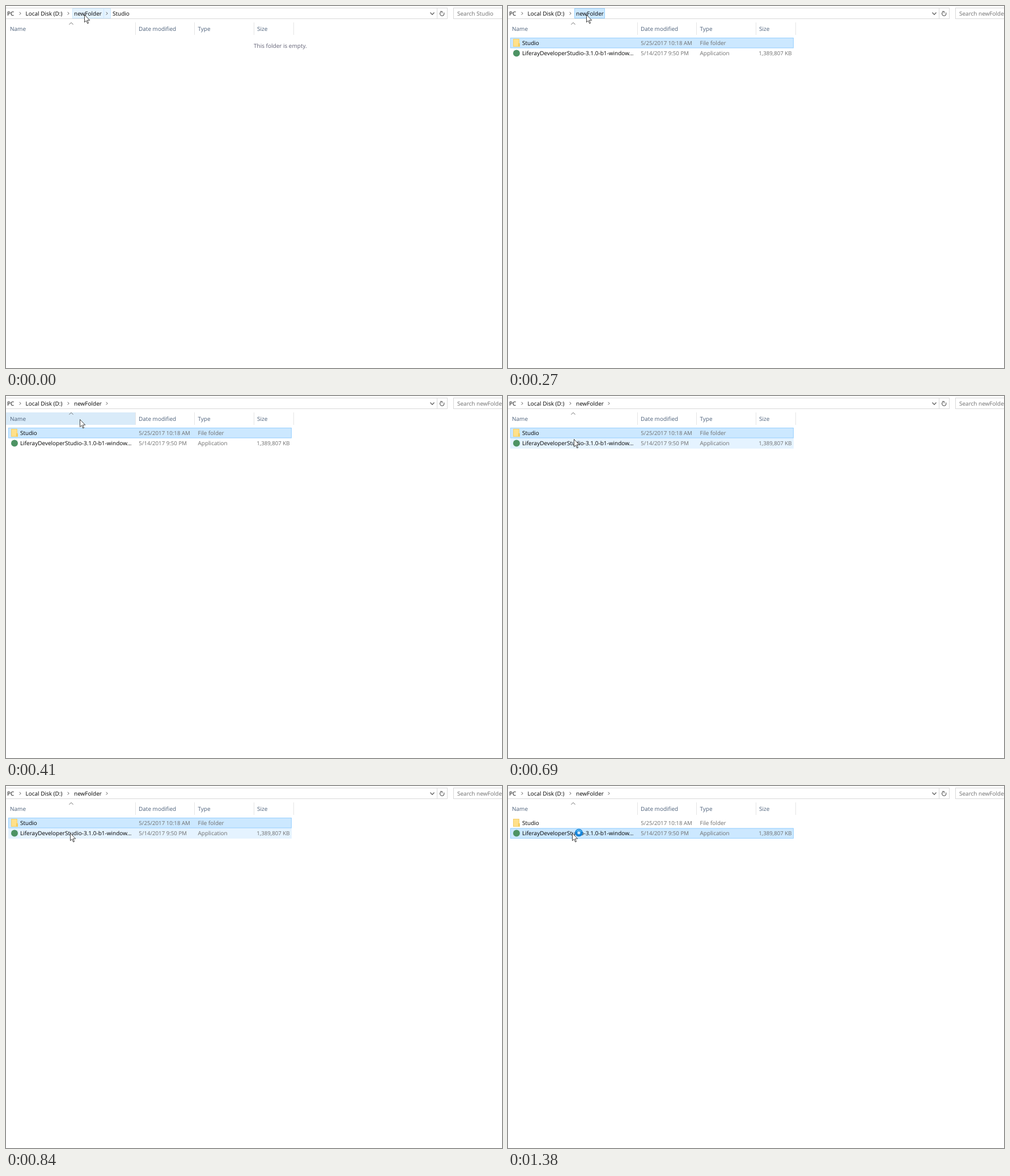
An HTML page with a canvas that plays this animation: 875 px wide and 640 px high, repeating every 8 s.

```html
<!DOCTYPE html>
<html lang="en">
<head>
<meta charset="utf-8">
<title>File browser</title>
<style>
html, body { margin: 0; width: 100%; height: 100%; overflow: hidden; background: #fff; }
canvas { display: block; }
</style>
</head>
<body>
<canvas width="875" height="640"></canvas>
<script>
const ctx = document.querySelector('canvas').getContext('2d');
const LOOP = 8000;
const PRESS = 140, OPEN = 270, HEADER_HOVER = 410, LEAVE_HEADER = 540, ROW_HOVER = 690, SELECT = 1100, BUSY = 1380;
const GREY = '#6d6d6d', HEADER = '#4c607a', HOVER = '#e5f3ff', ACTIVE = '#cce8ff', EDGE = '#99d1ff';
const ROW_TOP = 56, ROW_HEIGHT = 18.5;

// Pointer tip: start time, x, y
const pointerStops = [[0, 138, 15], [410, 130, 41], [540, 119, 68], [690, 116, 76], [840, 113, 83]];

function text(str, x, y, color = '#000', align = 'left', size = 10) {
  ctx.font = `${size}px "Open Sans", "Noto Sans", sans-serif`;
  ctx.fillStyle = color;
  ctx.textAlign = align;
  ctx.fillText(str, x, y);
}

function box(x, y, w, h, fill, edge) {
  ctx.fillStyle = fill;
  ctx.fillRect(x, y, w, h);
  if (!edge) return;
  ctx.strokeStyle = edge;
  ctx.lineWidth = 1;
  ctx.strokeRect(x + .5, y + .5, w - 1, h - 1);
}

function line(points, color, width = 1) {
  ctx.beginPath();
  points.forEach(([x, y]) => ctx.lineTo(x, y));
  ctx.strokeStyle = color;
  ctx.lineWidth = width;
  ctx.stroke();
}

function disc(x, y, r, color) {
  ctx.beginPath();
  ctx.arc(x, y, r, 0, Math.PI * 2);
  ctx.fillStyle = color;
  ctx.fill();
}

const chevron = x => line([[x - 1.3, 10.8], [x + 1.1, 13.2], [x - 1.3, 15.6]], '#555');

function addressBar(t) {
  const opened = t >= OPEN;
  box(-2, 3, 781, 20, '#fff', '#d9d9d9');
  line([[760.5, 3], [760.5, 23]], '#d9d9d9');
  box(789, 3, 90, 20, '#fff', '#d9d9d9');

  if (t < HEADER_HOVER) {
    const colors = t < PRESS ? [HOVER, ACTIVE] : [ACTIVE, EDGE];
    box(117, 4, opened ? 54 : 56, 18, ...colors);
    if (!opened) box(172, 4, 13, 18, ...colors);
  }
  text('PC', 2, 17);
  chevron(25);
  text('Local Disk (D:)', 34.5, 17);
  chevron(110);
  text('newFolder', 120, 17);
  if (!opened || t >= HEADER_HOVER) chevron(178);
  if (!opened) text('Studio', 188, 17);
  text('Search ' + (opened ? 'newFolder' : 'Studio'), 796, 17, GREY);

  line([[748.5, 11.5], [752, 15.2], [755.5, 11.5]], '#666', 1.4);
  ctx.beginPath();
  ctx.arc(769.3, 13.7, 3.6, -.6, Math.PI * 1.3);
  ctx.strokeStyle = '#555';
  ctx.lineWidth = 1.1;
  ctx.stroke();
  line([[766, 9.5], [769.3, 9.5], [769.3, 12.8]], '#555', 1.1);
}

function columns(t) {
  if (t >= HEADER_HOVER && t < LEAVE_HEADER) box(0, 29, 229, 22, '#d9ebf9');
  for (const x of [228.5, 332.5, 437.5, 507.5]) line([[x, 29], [x, 51]], '#e5e5e5');
  text('Name', 7, 44, HEADER);
  text('Date modified', 234, 44, HEADER);
  text('Type', 338.5, 44, HEADER);
  text('Size', 443, 44, HEADER);
  line([[111.5, 32.8], [115, 29.3], [118.5, 32.8]], '#666');
}

const rowBox = (index, fill, edge) => box(4, ROW_TOP + index * ROW_HEIGHT, 500, ROW_HEIGHT, fill, edge);

function row(y, name, date, type, size) {
  text(name, 25, y);
  text(date, 234.3, y, GREY, 'left', 9.7);
  text(type, 338.5, y, GREY);
  text(size, 500.5, y, GREY, 'right', 9.7);
}

function files(t) {
  if (t < OPEN) return text('This folder is empty.', 437, 74, '#5f5f73');
  if (t >= ROW_HOVER && t < SELECT) rowBox(1, HOVER);
  rowBox(t < SELECT ? 0 : 1, ACTIVE, EDGE);

  box(9, 58, 11, 14, '#ffe08a', '#f3cf6b');
  box(18, 66, 3, 6, '#f5cd5c');
  disc(15, 83.5, 6, '#4d9364');
  row(69, 'Studio', '5/25/2017 10:18 AM', 'File folder', '');
  row(87, 'LiferayDeveloperStudio-3.1.0-b1-window...', '5/14/2017 9:50 PM', 'Application', '1,389,807 KB');
}

function busyRing() {
  disc(125, 82.7, 6.9, '#1583d8');
  ctx.beginPath();
  ctx.arc(125, 82.7, 4.7, -2.6, -.4);
  ctx.strokeStyle = '#63c2f5';
  ctx.lineWidth = 1.6;
  ctx.stroke();
  disc(125, 82.7, 2.6, '#cce8ff');
}

function pointer(t) {
  const [, x, y] = pointerStops.findLast(([start]) => t >= start);
  ctx.save();
  ctx.translate(x + .5, y + .5);
  const shape = new Path2D('M0 0V13.2L3 10.5L5.3 15.5L7.1 14.7L4.9 9.7H9.2Z');
  ctx.fillStyle = '#fff';
  ctx.fill(shape);
  ctx.strokeStyle = '#2a2a2a';
  ctx.lineWidth = .9;
  ctx.stroke(shape);
  ctx.restore();
}

function draw(now) {
  const t = now % LOOP;
  ctx.fillStyle = '#fff';
  ctx.fillRect(0, 0, 875, 640);
  ctx.textRendering = 'geometricPrecision';
  addressBar(t);
  columns(t);
  files(t);
  if (t >= BUSY) busyRing();
  pointer(t);
}

const start = performance.now();
function tick() {
  draw(performance.now() - start);
  requestAnimationFrame(tick);
}
tick();
</script>
</body>
</html>
```
